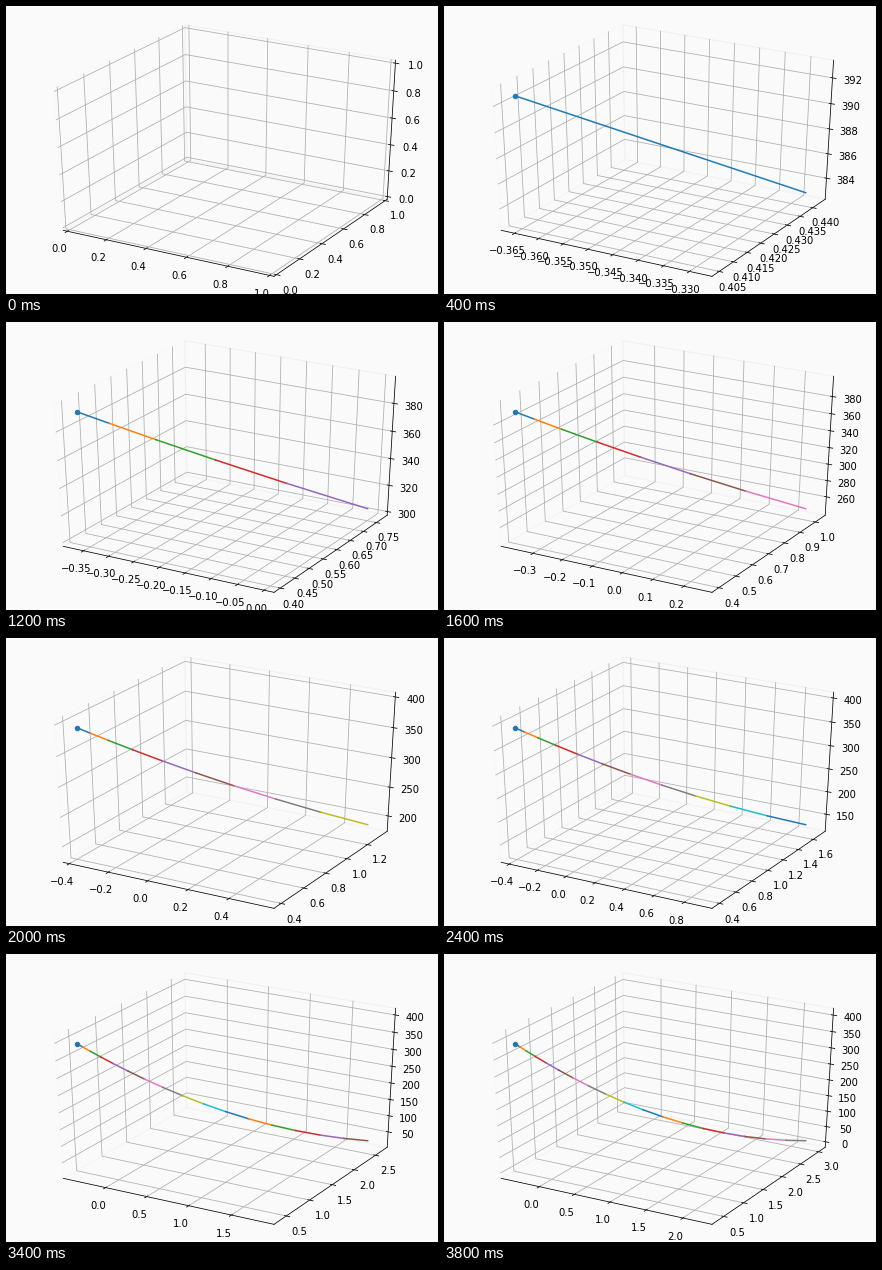
A matplotlib script that plays this animation: 432x288 px, repeating every 4 s.

```python
import numpy as np
import matplotlib.pyplot as plt
from matplotlib.animation import FuncAnimation
from matplotlib.ticker import MaxNLocator

FRAMES, STEP_MS = 20, 200
BG, GRID = "#fafafa", "#b0b0b0"
PANE_EDGES = ("#f8f8f8", "#f0f0f0", "#f5f5f5")
EDGE = 1 / 48            # gap between axis limits and the box walls
TICK_IN, TICK_OUT = 0.1 / 12, 0.2 / 12
LABEL_GAP = 11.5 * 48 / 720 / 12
LO, HI = -EDGE, 1 + EDGE

plt.rcParams["font.family"] = "DejaVu Sans"
plt.rcParams["font.size"] = 10

# Camera basis for elevation 30, azimuth -60, distance 10
RIGHT = np.array([np.sqrt(3) / 2, 0.5, 0])
UP = np.array([-0.25, np.sqrt(3) / 4, np.sqrt(3) / 2])
TOWARD = np.array([np.sqrt(3) / 4, -0.75, 0.5])
DIST = 10

# Descent path: the stride swells like a sine, the height is a parabola
n = np.arange(1, FRAMES - 1)
run = np.concatenate([[0], np.cumsum(0.191 * np.sin(0.0968 * (n + 1)))])
PATH = np.column_stack([
    -0.3651 + run,
    0.4052 + 1.01 * run,
    4 + 388.64 * (1 - run / 2.93) ** 2,
])

# index, axis line position, tick direction, outward sign
WALLS = np.array([LO, HI, LO])
AXES = (
    (0, np.array([LO, LO, LO]), 1, -1),
    (1, np.array([HI, LO, LO]), 0, 1),
    (2, np.array([HI, HI, LO]), 0, 1),
)

locator = MaxNLocator(nbins=9, steps=[1, 2, 2.5, 5, 10])

fig = plt.figure(figsize=(6, 4), dpi=72, facecolor=BG)
ax = fig.add_axes([0, 0, 1, 1])


def project(points):
    p = np.atleast_2d(points) - 0.5
    w = DIST - p @ TOWARD
    return (p @ RIGHT) / w, (p @ UP) / w


def stroke(points, color, width, **kw):
    ax.plot(*project(points), color=color, lw=width, **kw)


def moved(point, axis, value):
    q = np.array(point, float)
    q[axis] = value
    return q


def limits(count):
    """Lower and upper view limits for the first `count` path points."""
    if count == 0:
        return np.zeros(3), np.ones(3)
    pts = PATH[:count]
    lo, hi = pts.min(axis=0), pts.max(axis=0)
    if count == 1:
        lo, hi = lo - 0.05 * abs(lo), hi + 0.05 * abs(hi)
    pad = 0.05 * (hi - lo)
    return lo - pad, hi + pad


def ticks(lo, hi):
    """Tick positions in 0..1 and their labels."""
    vals = locator.tick_values(lo, hi)
    step = vals[1] - vals[0]
    digits = next(d for d in range(6)
                  if abs(step * 10**d - round(step * 10**d)) < 1e-6)
    eps = 1e-9 * (hi - lo)
    vals = [round(v, 8) + 0.0 for v in vals if lo - eps <= v <= hi + eps]
    return [((v - lo) / (hi - lo), f"{v:.{digits}f}".replace("-", "\u2212"))
            for v in vals]


def draw_panes():
    for i, color in enumerate(PANE_EDGES):
        a, b = (i + 1) % 3, (i + 2) % 3
        ring = [moved(moved(WALLS, a, u), b, v)
                for u, v in ((LO, LO), (HI, LO), (HI, HI), (LO, HI), (LO, LO))]
        stroke(ring, color, 1)


def draw_axis(i, base, tick_dir, sign, lo, hi):
    stroke([moved(base, i, LO), moved(base, i, HI)], "black", 0.75)
    marks = ticks(lo, hi)
    for t, _ in marks:
        corner = moved(WALLS, i, t)
        ends = [moved(corner, j, LO + HI - WALLS[j])
                for j in ((i + 1) % 3, (i + 2) % 3)]
        stroke([ends[0], corner, ends[1]], GRID, 0.8)
    for t, text in marks:
        foot = moved(base, i, t)
        edge = base[tick_dir]
        stroke([moved(foot, tick_dir, edge - sign * TICK_IN),
                moved(foot, tick_dir, edge + sign * TICK_OUT)], "black", 0.8)
        spot = foot + LABEL_GAP * np.sign(foot - 0.5)
        spot[i] = t
        x, y = project(spot)
        ax.text(x[0], y[0], text, ha="center", va="top", zorder=2)


def draw(frame):
    ax.clear()
    ax.set_axis_off()
    ax.set_xlim(-0.095, 0.09)
    ax.set_ylim(-0.095, 0.09)
    lo, hi = limits(frame)
    draw_panes()
    for i, base, tick_dir, sign in AXES:
        draw_axis(i, base, tick_dir, sign, lo[i], hi[i])
    if frame:
        pts = (PATH[:frame] - lo) / (hi - lo)
        for k in range(frame - 1):
            stroke(pts[k:k + 2], f"C{k % 10}", 1.5, zorder=3)
        ax.scatter(*project(pts[0]), s=20, color="C0", lw=1, zorder=4)
    return []


anim = FuncAnimation(fig, draw, frames=FRAMES, interval=STEP_MS,
                     init_func=lambda: [], repeat=True, repeat_delay=0)
plt.show()
```
